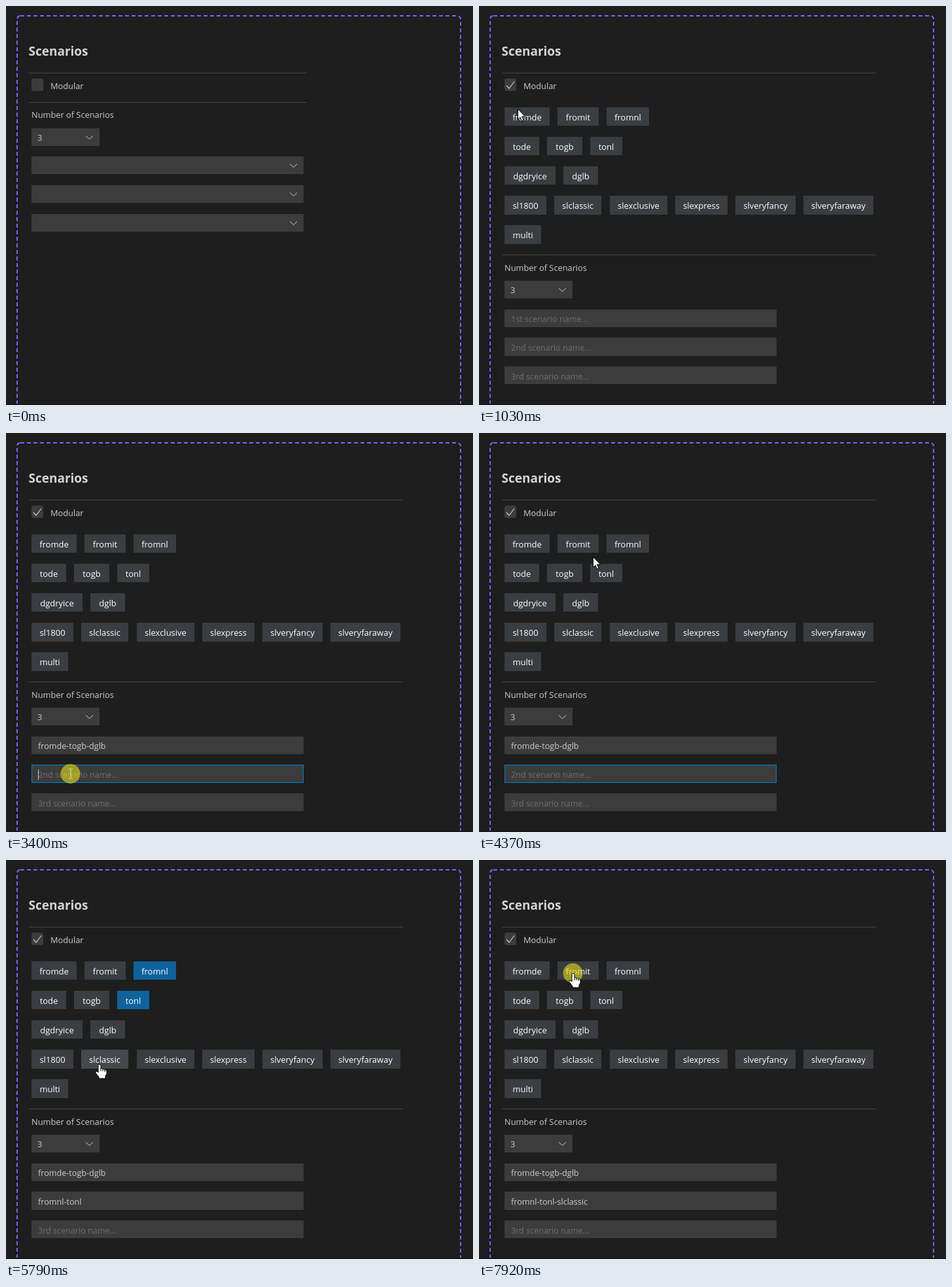
Animation of 714 by 610 pixels, one loop 7990 ms. Source, as an HTML page with a canvas:

```html
<!DOCTYPE html>
<html lang="en">
<head>
<meta charset="utf-8">
<title>Scenarios</title>
<style>
  html, body { margin: 0; height: 100%; overflow: hidden; background: #1e1e1e; }
  canvas { display: block; }
</style>
</head>
<body>
<canvas id="stage" width="714" height="610"></canvas>
<script>
const ctx = document.getElementById('stage').getContext('2d', { alpha: false });
const LOOP = 7990, EXPAND = 890;
const SECOND_ROW = 3400, THIRD_ROW = 7050;

// Each row: top, height, then [label, left, right]
const tagRows = [
  [155, 28, ['fromde', 39, 108], ['fromit', 120, 183], ['fromnl', 195, 260]],
  [200, 28, ['tode', 39, 92], ['togb', 104, 158], ['tonl', 170, 219]],
  [245, 28, ['dgdryice', 39, 117], ['dglb', 129, 182]],
  [290, 29, ['sl1800', 39, 103], ['slclassic', 115, 187], ['slexclusive', 200, 288],
    ['slexpress', 300, 380], ['slveryfancy', 392, 484], ['slveryfaraway', 496, 603]],
  [335, 29, ['multi', 39, 95]],
];
const ordinals = ['1st', '2nd', '3rd'];

// time, input row, tag
const clicks = [
  [1910, 0, 'fromde'], [2450, 0, 'togb'], [2860, 0, 'dglb'],
  [5040, 1, 'fromnl'], [5500, 1, 'tonl'], [6130, 1, 'slclassic'],
];
// from, to, tag
const hovers = [
  [1170, 1980, 'fromde'], [2110, 2520, 'togb'], [2590, 2930, 'dglb'],
  [4900, 5180, 'fromnl'], [5320, 5720, 'tonl'], [5790, 6200, 'slclassic'],
];
// from, to, input row
const focuses = [[SECOND_ROW, 4900, 1], [THIRD_ROW, 7850, 2]];
const presses = [[770, 890], [1580, 1910], [2250, 2450], [2720, 2860], [3330, 3470],
  [4900, 5040], [5390, 5500], [5990, 6130], [7050, 7190], [7900, LOOP]];
// time, x, y
const path = [
  [70, 488, 431], [300, 310, 290], [540, 110, 160], [720, 45, 120], [890, 45, 121],
  [1030, 59, 157], [1300, 70, 171], [1580, 73, 173], [1910, 73, 173], [2110, 120, 205],
  [2250, 149, 217], [2390, 149, 217], [2450, 160, 232], [2700, 172, 257], [2860, 172, 257],
  [3190, 102, 490], [3330, 99, 521], [3540, 99, 521], [4020, 150, 240], [4370, 174, 189],
  [4500, 214, 177], [4650, 214, 177], [4700, 217, 174], [5040, 217, 174], [5390, 196, 215],
  [5650, 196, 215], [5790, 143, 312], [6130, 143, 312], [6450, 107, 510], [6650, 100, 550],
  [6910, 101, 563], [7050, 101, 565], [7190, 101, 565], [7640, 138, 129], [7780, 143, 162],
  [7920, 144, 173],
];
const cursors = [
  [70, 'arrow'], [1100, 'hand'], [1980, 'arrow'], [2110, 'hand'], [2930, 'arrow'],
  [3260, 'beam'], [3540, 'arrow'], [4700, 'hand'], [5180, 'arrow'], [5320, 'hand'],
  [5720, 'arrow'], [5790, 'hand'], [6200, 'arrow'], [6720, 'beam'], [7190, 'arrow'],
  [7850, 'hand'],
];

const shapes = {
  arrow: new Path2D('M.5 .5V16.5L4 13L6.5 19L9 18L6.5 12H11.5Z'),
  hand: new Path2D('M-2 1.5Q0 -1 2 1.5V7Q4 5.5 5 8Q7 6.5 8 9Q11 8 11 11.5V15L9 18V22H-1V20L-6 13.5Q-6.5 10.5 -4 11L-2 13Z'),
  beam: new Path2D('M-3 -7.5H-1L0 -6.5L1 -7.5H3M0 -6.5V6.5M-3 7.5H-1L0 6.5L1 7.5H3'),
};
const knuckles = new Path2D('M2 7V11M5 8V11M8 9V12');

const during = (list, t) => list.find(([from, to]) => t >= from && t < to);

function rect(x, y, w, h, color) {
  ctx.fillStyle = color;
  ctx.fillRect(x, y, w, h);
}

function text(str, x, y, color = '#ccc', size = 12.8, align = 'left', weight = 400) {
  ctx.font = `${weight} ${size}px "Open Sans", "Noto Sans", sans-serif`;
  ctx.textAlign = align;
  ctx.fillStyle = color;
  ctx.fillText(str, x, y);
}

function polyline(points, color = '#ccc', width = 1) {
  ctx.strokeStyle = color;
  ctx.lineWidth = width;
  ctx.beginPath();
  points.forEach(p => ctx.lineTo(...p));
  ctx.stroke();
}

function dropdown(y, width, value = '') {
  const x = 39 + width - 21;
  rect(39, y, width, 27, '#3c3c3c');
  polyline([[x, y + 11.5], [x + 5.5, y + 16.5], [x + 11, y + 11.5]]);
  text(value, 48, y + 19);
}

function frame() {
  rect(0, 0, 714, 610, '#1e1e1e');
  ctx.strokeStyle = '#7b61ff';
  ctx.lineWidth = 2;
  ctx.setLineDash([6, 4]);
  ctx.beginPath();
  ctx.roundRect(17, 15, 678, 700, 5);
  ctx.stroke();
  ctx.setLineDash([]);
  rect(0, 608, 714, 2, '#181818');
}

function tags(t, row) {
  const hovered = during(hovers, t)?.[2];
  for (const [y, h, ...items] of tagRows) {
    for (const [label, left, right] of items) {
      const on = clicks.some(c => c[0] <= t && c[1] === row && c[2] === label);
      const [base, hover] = on ? ['#0e639c', '#1177bb'] : ['#3a3d41', '#45494e'];
      rect(left, y, right - left, h, label === hovered ? hover : base);
      text(label, (left + right) / 2, y + 20, '#fff', 13, 'center');
    }
  }
}

function inputs(t) {
  const focus = during(focuses, t);
  [464, 507, 551].forEach((y, i) => {
    const h = i === 1 ? 28 : 27;
    const name = clicks.filter(c => c[0] <= t && c[1] === i).map(c => c[2]).join('-');
    rect(39, y, 416, h, '#3c3c3c');
    text(name || ordinals[i] + ' scenario name...', 49, y + (i ? 20 : 19), name ? '#ccc' : '#6f6f6f', 12.6);
    if (focus?.[2] !== i) return;
    ctx.strokeStyle = '#007fd4';
    ctx.lineWidth = 1;
    ctx.strokeRect(39.5, y + .5, 415, h - 1);
    if ((t - focus[0]) % 1000 < 500) rect(49, y + 7, 1, 16, '#ccc');
  });
}

function pointer(t) {
  if (t < path[0][0]) return;
  const next = path.findIndex(p => p[0] > t);
  const b = path.at(next), a = next < 0 ? b : path[next - 1];
  const k = (t - a[0]) / (b[0] - a[0] || 1);
  const mix = i => Math.round(next < 0 ? b[i] : a[i] + (b[i] - a[i]) * k);
  const x = mix(1), y = mix(2);
  const kind = cursors.findLast(c => c[0] <= t)[1];
  if (during(presses, t)) {
    ctx.fillStyle = 'rgba(230, 220, 20, .6)';
    ctx.beginPath();
    ctx.arc(x - .5, y, 15, 0, 7);
    ctx.fill();
  }
  ctx.save();
  ctx.translate(x, y);
  ctx.lineWidth = 1;
  ctx.strokeStyle = kind === 'beam' ? '#ddd' : '#000';
  ctx.fillStyle = '#fff';
  if (kind !== 'beam') ctx.fill(shapes[kind]);
  ctx.stroke(shapes[kind]);
  if (kind === 'hand') ctx.stroke(knuckles);
  ctx.restore();
}

function draw(t) {
  const modular = t >= EXPAND;
  const row = t < SECOND_ROW ? 0 : t < THIRD_ROW ? 1 : 2;
  const shift = modular ? 233 : 0;
  const ruleWidth = modular ? 572 : 425;

  frame();
  text('Scenarios', 34.5, 76, '#d4d4d4', 19, 'left', 700);
  rect(35, 102, ruleWidth, 1, '#454545');
  rect(35, 147 + shift, ruleWidth, 1, '#454545');

  ctx.fillStyle = '#3c3c3c';
  ctx.beginPath();
  ctx.roundRect(39, 111, 18, 19, 3);
  ctx.fill();
  text('Modular', 68, 127);
  text('Number of Scenarios', 39, 171 + shift + (modular ? 1 : 0));
  dropdown(187 + shift, 104, '3');

  if (modular) {
    polyline([[42, 121.5], [46, 126], [54, 115.5]], '#ccc', 1.2);
    tags(t, row);
    inputs(t);
  } else {
    [230, 274, 318].forEach(y => dropdown(y, 416));
  }
  pointer(t);
}

function tick() {
  draw(performance.now() % LOOP);
  requestAnimationFrame(tick);
}
tick();
</script>
</body>
</html>
```
